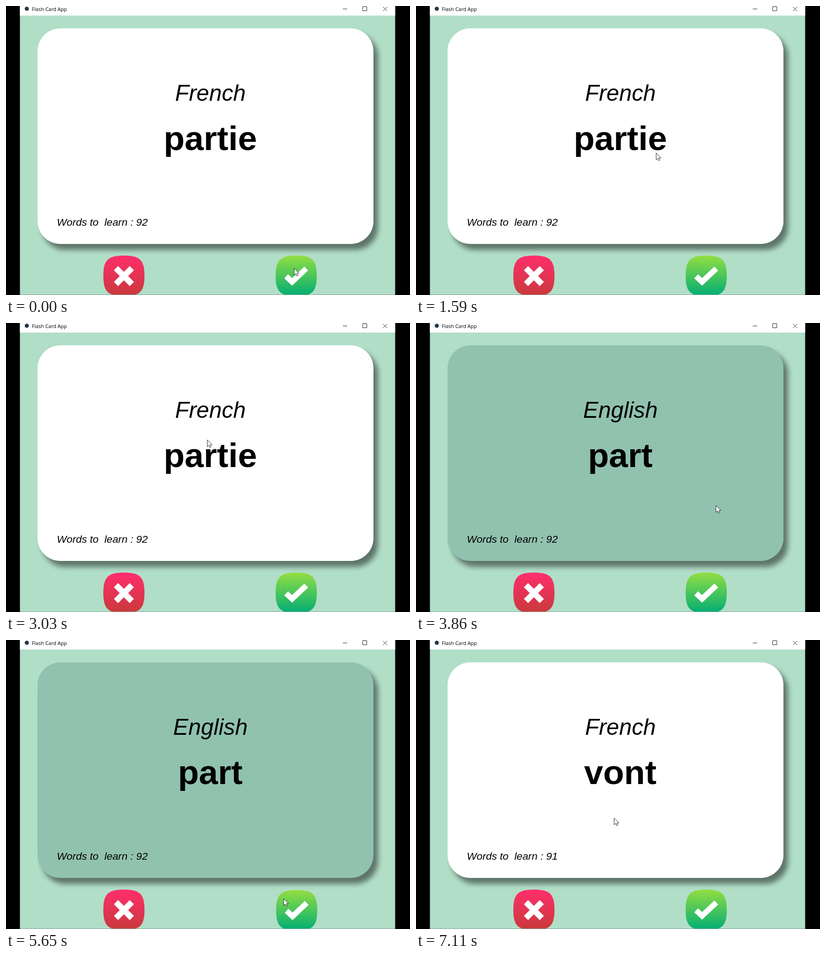
Write an HTML page that moves like this. It is 884 px wide and 634 px high and loops after 8 s.

```html
<!DOCTYPE html>
<html lang="en">
<head>
<meta charset="utf-8">
<title>Flash cards</title>
<style>
html, body { margin: 0; width: 100%; height: 100%; overflow: hidden; background: #000; }
svg { display: block; width: 884px; height: 634px; }
text { font-family: "Liberation Sans", Arial, sans-serif; white-space: pre; }
.mid { text-anchor: middle; }
.it { font-style: italic; }
</style>
</head>
<body>
<svg viewBox="0 0 884 634">
  <defs>
    <linearGradient id="red" x2="0" y2="1"><stop stop-color="#ff2e6c"/><stop offset="1" stop-color="#c83a3b"/></linearGradient>
    <linearGradient id="green" x2="0" y2="1"><stop stop-color="#93de42"/><stop offset="1" stop-color="#00ad74"/></linearGradient>
    <filter id="blur" x="-10%" y="-10%" width="120%" height="120%"><feGaussianBlur stdDeviation="6"/></filter>
    <path id="tile" d="M-45-.5C-45-35-35-45 0-45S45-35 45-.5 35 44 0 44-45 34-45-.5Z"/>
  </defs>
  <rect width="884" height="634"/>
  <rect x="30.5" width="821" height="634" fill="#b1dec7"/>
  <rect x="30.5" width="821" height="21" fill="#fff"/>

  <circle cx="45.5" cy="6" r="4.5" fill="#22384a"/>
  <text x="56.5" y="11" font-size="11" style="font-family:'Open Sans','Noto Sans',sans-serif">Flash Card App</text>
  <path d="M737 6.5h9.5M780.5 1.5h9v9h-9zM825 2l9 9m0-9l-9 9" fill="none" stroke="#222"/>

  <rect x="79" y="61" width="735" height="474" rx="50" opacity=".47" filter="url(#blur)"/>
  <rect id="card" x="69" y="49" width="735" height="473" rx="50"/>
  <text id="lang" class="mid it" x="447.3" y="208" font-size="49.7"></text>
  <text id="word" class="mid" x="447" y="315.5" font-size="75"></text>
  <text id="left" class="it" x="111.3" y="482" font-size="22.8"></text>

  <g transform="translate(258 592.5)">
    <use href="#tile" fill="url(#red)"/>
    <path d="M-17.3-17.3L17.3 17.3M17.3-17.3L-17.3 17.3" stroke="#fff" stroke-width="13"/>
  </g>
  <g id="yes">
    <use href="#tile" fill="url(#green)"/>
    <path d="M-22 .5L-9 12.7 22-16.7" fill="none" stroke="#fff" stroke-width="12"/>
  </g>
  <rect x="31" y="633" width="820" height="1" fill="#86a395"/>
  <path id="mouse" d="M.5.5V15.6L4 12.3 6.3 17.3 8.7 16.2 6.5 11.3H11Z" fill="#fff" stroke="#111" stroke-width=".9"/>
</svg>
<script>
const $ = id => document.getElementById(id);
const LOOP = 8000, FLIP = 3080, PRESS = 5650, NEXT = 5880, STEP = 47;

// Pointer sweeps: start and end time, end point, and the halfway point if curved.
const home = [630, 575];
const sweeps = [
  [580, 1360, [601, 382], [428, 352]],
  [1410, 1590, [525, 322]],
  [1840, 2390, [439, 240], [338, 190]],
  [2790, 3170, [440, 264]],
  [3450, 3680, [680, 388]],
  [3860, 4660, [575, 508], [540, 475]],
  [4710, 5500, [607, 567], [570, 504]],
  [6310, 6640, [522, 213], [418, 440]],
  [6870, 7110, [433, 390]]
];

// Parabola from a to b that passes through mid at u = 0.5.
const arc = (a, b, mid, u) => a.map((p, i) => {
  const line = p + (b[i] - p) * u;
  const bend = mid ? mid[i] - (p + b[i]) / 2 : 0;
  return Math.round(line + 4 * bend * u * (1 - u));
});

function pointer(t) {
  const i = sweeps.findLastIndex(s => t >= s[0]);
  if (i < 0) return home;
  const [t0, t1, end, mid] = sweeps[i];
  const gaps = Math.round((t1 - t0) / STEP);
  const step = 1 + Math.floor(gaps * Math.min(1, (t - t0) / (t1 - t0)));
  return arc(i ? sweeps[i - 1][2] : home, end, mid, step / (gaps + 1));
}

function draw(t) {
  const back = t >= FLIP && t < NEXT, next = t >= NEXT;
  $("card").setAttribute("fill", back ? "#91c2af" : "#fff");
  $("lang").textContent = back ? "English" : "French";
  $("word").textContent = next ? "vont" : back ? "part" : "partie";
  $("word").setAttribute("font-weight", 700);
  $("left").textContent = "Words to  learn : " + (next ? 91 : 92);
  const sink = t >= PRESS && !next ? 1 : 0;
  $("yes").setAttribute("transform", `translate(${635 + sink} ${592.5 + sink})`);
  $("mouse").setAttribute("transform", `translate(${pointer(t)})`);
}

let start;
function tick(now) {
  start ??= now;
  draw((now - start) % LOOP);
  requestAnimationFrame(tick);
}
draw(0);
requestAnimationFrame(tick);
</script>
</body>
</html>
```
